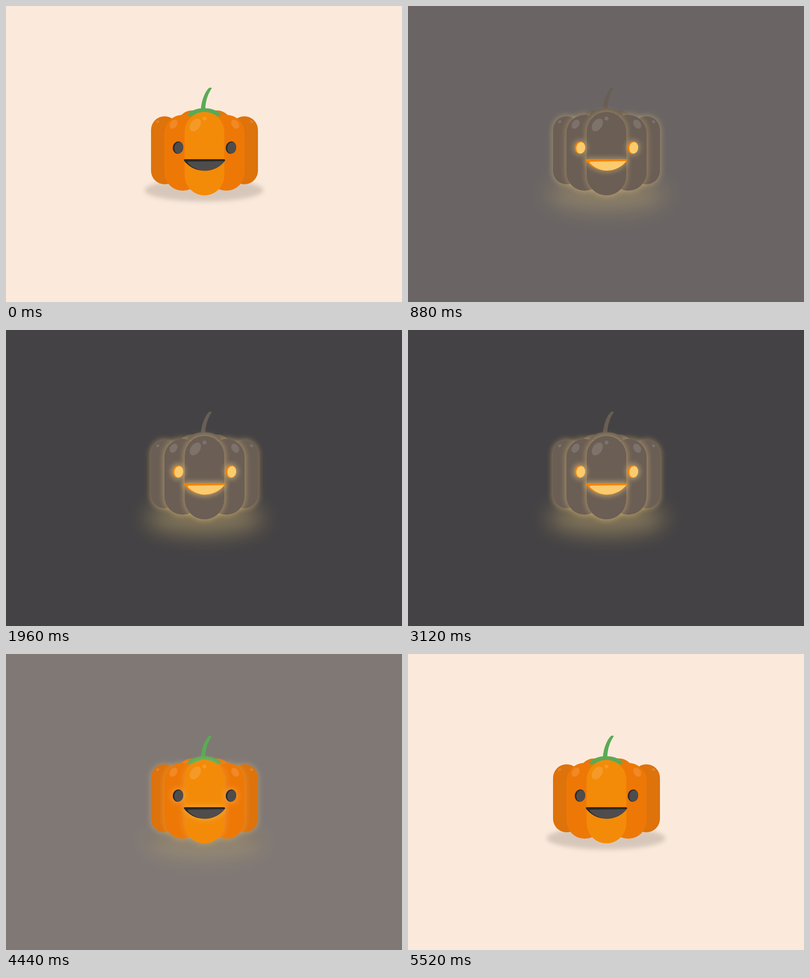
Recreate the animation shown at these times as an HTML page. Size 800 px wide and 601 px high, loop 5560 ms.

```html
<!DOCTYPE html>
<html lang="en">
<head>
<meta charset="utf-8">
<title>Pumpkin lantern</title>
<style>
  html, body { margin: 0; width: 100%; height: 100%; overflow: hidden; background: #fbeadc; }
  svg {
    display: block; width: 100vw; height: 100vh;
    --side: #de720b; --mid: #ee7806; --front: #f38b08; --back: #e6780c;
    --leaf: #5aaa55; --rim: #2b2927; --hole: #4f4c4d;
  }
  svg.lit {
    --side: #6a5e55; --mid: #6a5e55; --front: #6a5e55; --back: #6a5e55;
    --leaf: #685e54; --rim: #f38205; --hole: #fbcb6e;
  }
  .side { fill: var(--side); }
  .mid { fill: var(--mid); }
  .front { fill: var(--front); }
  .back { fill: var(--back); }
  .leaf { fill: var(--leaf); }
  .rim { fill: var(--rim); }
  .hole { fill: var(--hole); }
  .shine { fill: #fff; opacity: .13; }
  .halo { fill: #f5cd7c; stroke: #f5cd7c; stroke-width: 4px; filter: blur(6px); }
  .pool { fill: #c9ae70; filter: blur(22px); }
  .shadow { fill: #4a4038; opacity: .2; filter: blur(5px); }
</style>
</head>
<body>
<svg id="scene" viewBox="0 0 800 601" preserveAspectRatio="none"></svg>
<script>
const LOOP = 5560, FADE = 720, ON = 530, OFF = 4288;
const DAY = [251, 234, 220], NIGHT = [68, 66, 68];
const scene = document.getElementById('scene');

// shape strings, drawn once as a soft halo and once solid
const shape = (tag, cls) => `<${tag} class="${cls}"/>`;
const glow = (content, strength) => `<g class="glow" data-max="${strength}">${content}</g>`;
const halo = (tag, strength) => glow(shape(tag, 'halo'), strength);

const lobe = (cls, x, y, w, h) => {
  const tag = `rect x="${x}" y="${y}" width="${w}" height="${h}" rx="${w / 2}"`;
  return halo(tag, 0.45) + shape(tag, cls);
};
const oval = (cls, x, y, rx, ry, turn = 0) =>
  shape(`ellipse cx="${x}" cy="${y}" rx="${rx}" ry="${ry}" transform="rotate(${turn} ${x} ${y})"`, cls);
const path = (cls, d) => shape(`path d="${d}"`, cls);

const eye = (x, y) =>
  halo(`ellipse cx="${x}" cy="${y}" rx="11" ry="13"`, 0.6) +
  oval('rim', x, y, 10.5, 12.6, 8) +
  oval('hole', x + 1.5, y + 0.6, 9, 11.6, 8);

const mouth = 'M359 313Q359 311 362 311H440Q443 311 442.500 314C433 327 417 334.500 401 334.500C384 334.500 368 326 359 313Z';
const tongue = 'M369 316L441 315C432 327 417 334.200 401 334.200C389 334.200 376 328 367.500 319Q366 316 369 316Z';
const cap = 'M367 221C373 212 385 207.500 400 207.500C416 207.500 428 212 434 221Q434 224 430 224L425 224H376L370 224Q366 224 367 221Z';
const stem = 'M393.500 210C395 193 401 175 409.500 167Q411 165 416 166.500C408 178 403 193 402.500 210Z';

scene.innerHTML = [
  '<g id="shade">' + oval('shadow', 400, 374, 120, 23) + '</g>',
  glow(oval('pool', 401, 382, 118, 32), 0.5),
  path('leaf', stem),
  shape('rect x="346" y="212" width="60" height="120" rx="30"', 'back'),
  shape('rect x="396" y="212" width="60" height="120" rx="30"', 'back'),
  lobe('side', 293, 224, 55, 138),
  lobe('side', 454, 224, 55, 138),
  lobe('mid', 320, 221, 74, 154),
  lobe('mid', 408, 221, 74, 154),
  path('leaf', cap),
  lobe('front', 361, 215, 80, 169.5),
  oval('shine', 382.5, 241.5, 9.5, 14.5, 35),
  oval('shine', 401, 228.5, 4, 4),
  oval('shine', 338.5, 240, 7, 10, 35),
  oval('shine', 463, 240, 7, 10, -35),
  oval('shine', 306.5, 235, 3.4, 2.6, -25),
  oval('shine', 496, 235, 3.4, 2.6, 25),
  eye(347.5, 287.5),
  eye(454.5, 287.5),
  halo(`path d="${mouth}"`, 0.6),
  path('rim', mouth),
  path('hole', tongue)
].join('');

const glows = [...scene.querySelectorAll('.glow')];
const shade = document.getElementById('shade');

// cubic-bezier(.25, .1, .25, 1)
function ease(x) {
  if (x <= 0) return 0;
  if (x >= 1) return 1;
  const curve = (a, b, u) => 3 * a * u * (1 - u) ** 2 + 3 * b * u * u * (1 - u) + u ** 3;
  let lo = 0, hi = 1;
  for (let i = 0; i < 24; i++) {
    const u = (lo + hi) / 2;
    if (curve(0.25, 0.25, u) < x) lo = u; else hi = u;
  }
  return curve(0.1, 1, lo);
}

function render(t) {
  const night = ease((t - ON) / FADE) - ease((t - OFF) / FADE);
  const bg = DAY.map((c, i) => Math.round(c + (NIGHT[i] - c) * night));
  document.body.style.background = `rgb(${bg})`;
  scene.classList.toggle('lit', t >= ON && t < OFF);
  shade.style.opacity = 1 - night;
  for (const g of glows) g.style.opacity = g.dataset.max * night;
}

const start = performance.now();
function tick() {
  render((performance.now() - start) % LOOP);
  requestAnimationFrame(tick);
}
render(0);
requestAnimationFrame(tick);
</script>
</body>
</html>
```
